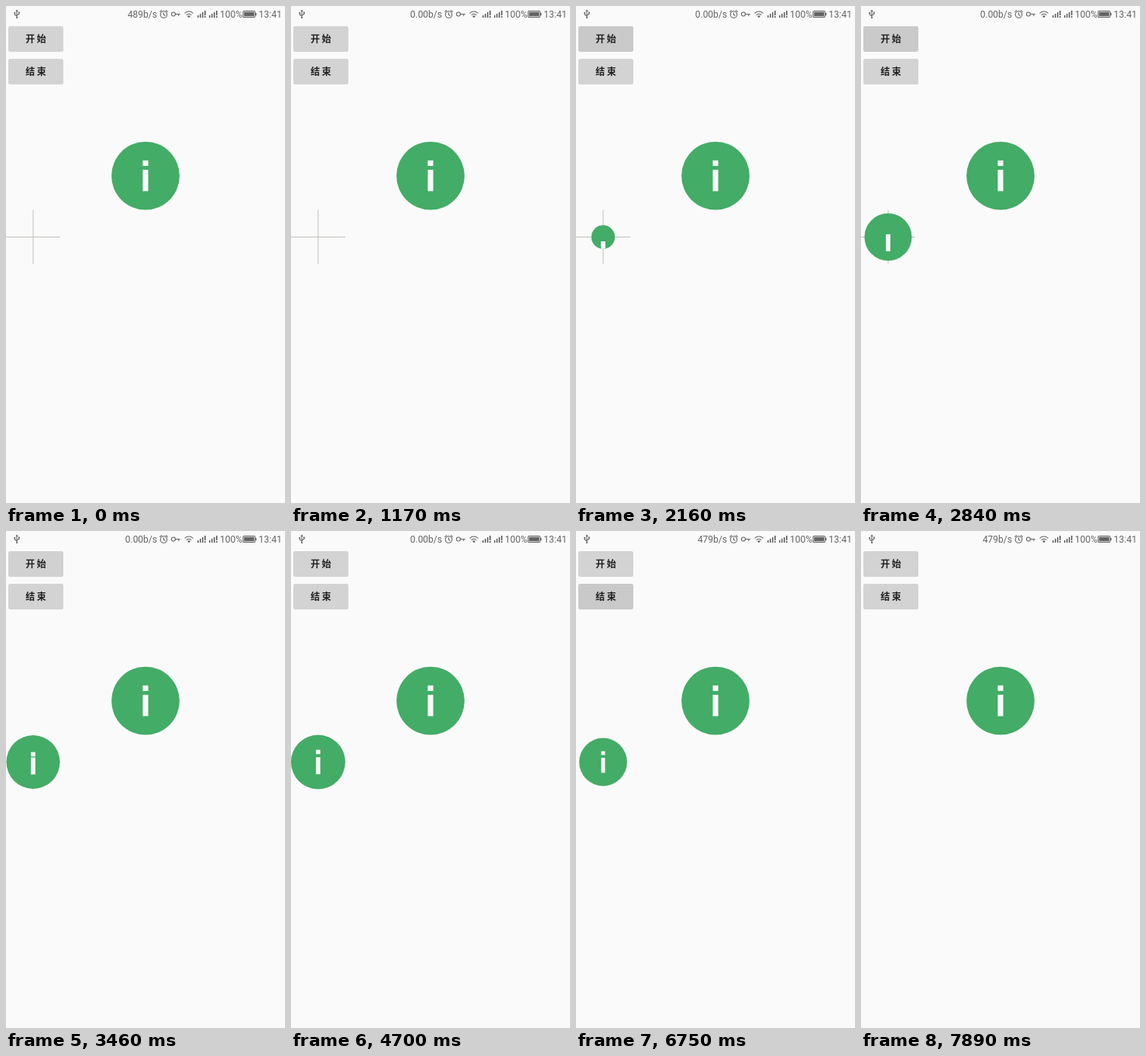
An HTML page that plays this animation: 360 px wide and 640 px high, repeating every 7.91 s.

```html
<!DOCTYPE html>
<html lang="zh">
<head>
<meta charset="utf-8">
<title>Info badge</title>
<style>
  html, body { margin: 0; width: 100%; height: 100%; overflow: hidden; background: #fafafa; }
  svg { display: block; width: 100%; height: 100%; }
  .status { font: 12px Roboto, sans-serif; fill: #646464; }
  .label { font: 600 12px "Noto Sans CJK SC", "Noto Sans CJK", sans-serif; fill: #202020; text-anchor: middle; }
  .line { fill: none; stroke: #646464; stroke-width: 1.1; }
  .solid { fill: #646464; }
  .green { fill: #43ac66; }
  .paper { fill: #fafafa; }
</style>
</head>
<body>
<svg viewBox="0 0 360 640">
  <defs>
    <clipPath id="clip"><circle id="clipDisc" r="35"/></clipPath>
    <g id="bars">
      <path class="solid" d="M0 15v-3h1.6v3zM3 15v-5h1.6v5zM6 15v-7h1.6v7zM9 15v-2h1.7v2zM9 12v-6h1.7v6z"/>
    </g>
  </defs>

  <g id="statusBar">
    <path class="line" d="M14 6.5v8.5M11.2 9v2l2.8 2M16.8 8.5v2l-2.8 1.6"/>
    <path class="solid" d="M14 4.5l1.7 2.6h-3.4zM10.3 8h1.8v1.8h-1.8zM16 7.6h1.7v1.8H16z"/>
    <circle class="solid" cx="14" cy="15" r="1.1"/>
    <text class="status" id="speed" x="195" y="14.7" text-anchor="end"></text>
    <circle class="line" cx="203.5" cy="11" r="4.3"/>
    <path class="line" d="M203.5 8.5v2.8l2 1.2M198.3 7.6l2.6-2.2M208.7 7.6l-2.6-2.2"/>
    <circle class="line" cx="216" cy="10.5" r="2.5"/>
    <path class="line" d="M218.5 10.5h6.3M222.8 10.5v2.6"/>
    <path class="line" d="M230.5 9.3q5.5-4.6 11 0M232.7 11.6q3.3-2.6 6.6 0"/>
    <path class="solid" d="M234 13q2-1.4 4 0l-2 2.2z"/>
    <use href="#bars" x="247"/>
    <use href="#bars" x="262"/>
    <text class="status" x="276" y="14.7">100%</text>
    <rect class="line" x="306" y="6.5" width="15.2" height="8" rx="1"/>
    <path class="solid" d="M307.2 7.7h12.8v5.6h-12.8zM321.6 8.8h1.6v3.4h-1.6z"/>
    <text class="status" x="326" y="14.7">13:41</text>
  </g>

  <g id="buttons"></g>

  <g transform="translate(180 218.7) scale(1.255)">
    <circle class="green" r="35"/>
    <rect class="paper" x="-2.8" y="-15.8" width="5.6" height="5.6"/>
    <rect class="paper" x="-2.8" y="-6.2" width="5.6" height="21.9"/>
  </g>

  <g transform="translate(35 297.5)">
    <path id="cross" d="M-35 0H35M0-35V35" stroke="#c0c0b8" fill="none"/>
    <g id="badge">
      <circle id="disc" class="green" r="35"/>
      <g clip-path="url(#clip)">
        <rect id="dot" class="paper" x="-2.8" width="5.6" height="5.6"/>
        <rect id="stem" class="paper" x="-2.8" width="5.6" height="21.9"/>
      </g>
    </g>
  </g>
</svg>
<script>
const LOOP = 7910, RADIUS = 35;
const GROW = { start: 1350, span: 2500 };
const DOT = { start: 3000, span: 1000 };
const SHRINK = { start: 5813, span: 1270 };
const PRESS_START = { start: 1170, span: 2430 };
const PRESS_END = { start: 5340, span: 2430 };
const $ = id => document.getElementById(id);

const phase = (t, { start, span }) => Math.min(1, Math.max(0, (t - start) / span));

// cubic-bezier(.4, 0, .2, 1), solved by bisection
function fastOutSlowIn(x) {
  if (x <= 0 || x >= 1) return x;
  let lo = 0, hi = 1;
  for (let i = 0; i < 24; i++) {
    const s = (lo + hi) / 2, r = 1 - s;
    if (1.2 * r * r * s + 0.6 * r * s * s + s ** 3 < x) lo = s; else hi = s;
  }
  return lo * lo * (3 - 2 * lo);
}

const anticipate = x => x * x * (3 * x - 2);

const button = (id, label, y) => `
  <rect x="3" y="${y}" width="71" height="33" rx="2.5" fill="#d3d3d3"/>
  <rect id="${id}" x="3" y="${y}" width="71" height="33" rx="2.5"/>
  <text class="label" x="38.5" y="${y + 20.8}">${label}</text>`;
$("buttons").innerHTML = button("pressStart", "开 始", 26) + button("pressEnd", "结 束", 68);

const setPress = (id, x) => $(id).setAttribute("opacity", 0.05 * Math.sin(Math.PI * x));

function draw(t) {
  $("speed").textContent = t < 530 ? "489b/s" : t < 5530 ? "0.00b/s" : "479b/s";
  setPress("pressStart", phase(t, PRESS_START));
  setPress("pressEnd", phase(t, PRESS_END));

  const grow = fastOutSlowIn(phase(t, GROW));
  $("disc").setAttribute("r", RADIUS * grow);
  $("clipDisc").setAttribute("r", RADIUS * grow);

  // the dot rides on the stem, then rises from it
  const stemY = -6.2 + 21 * (1 - grow);
  $("stem").setAttribute("y", stemY);
  $("dot").setAttribute("y", stemY - 9.6 * fastOutSlowIn(phase(t, DOT)));

  const scale = 1 - anticipate(phase(t, SHRINK));
  $("badge").setAttribute("transform", `scale(${scale})`);
  $("badge").setAttribute("visibility", grow > 0 && scale > 0 ? "visible" : "hidden");
  $("cross").setAttribute("visibility", grow < 1 ? "visible" : "hidden");
}

const begin = performance.now();
function tick() {
  draw((performance.now() - begin) % LOOP);
  requestAnimationFrame(tick);
}
tick();
</script>
</body>
</html>
```
